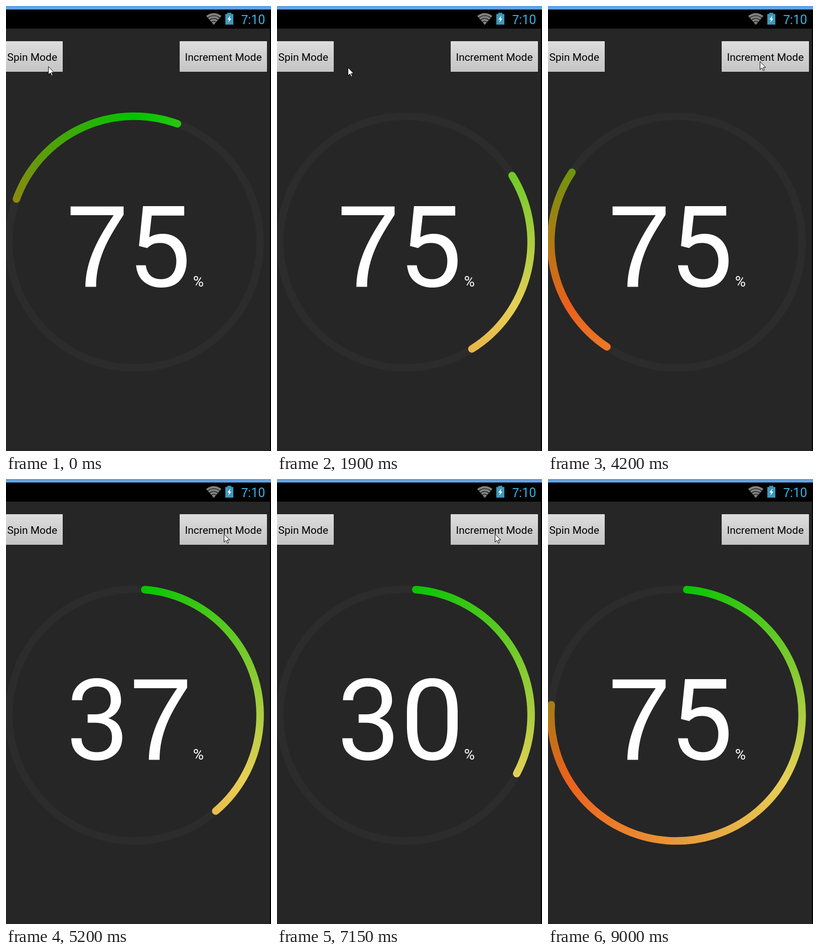
Recreate the animation shown at these times as an HTML page with a canvas. Size 528 by 885 pixels, loop 9300 ms.

```html
<!DOCTYPE html>
<html lang="en">
<head>
<meta charset="utf-8">
<title>Progress wheel</title>
<style>
  html, body { margin: 0; width: 528px; height: 885px; overflow: hidden; background: #262626; }
  canvas, svg { position: absolute; left: 0; top: 0; display: block; }
  text { font-family: Roboto, "Open Sans", sans-serif; font-kerning: none; white-space: pre; }
  .label { font-size: 21px; text-anchor: middle; fill: #000; }
  .count { font-size: 225px; fill: #fff; }
  .unit { font-size: 29px; fill: #fff; }
  .clock { font-size: 25px; fill: #33b5e5; }
  /* a seven with a curved stem */
  .seven { font-family: "Liberation Sans", Arial, sans-serif; font-size: 1.033em; letter-spacing: -.017em; }
</style>
</head>
<body>
<canvas id="wheel" width="528" height="885"></canvas>
<svg width="528" height="885" viewBox="0 0 528 885">
  <defs>
    <linearGradient id="grey" x2="0" y2="1">
      <stop offset="0" stop-color="#dedede"/>
      <stop offset=".5" stop-color="#d0d0d0"/>
      <stop offset="1" stop-color="#c5c5c5"/>
    </linearGradient>
    <linearGradient id="orange" x2="0" y2="1">
      <stop offset="0" stop-color="#ffa000"/>
      <stop offset="1" stop-color="#ffa724"/>
    </linearGradient>
  </defs>

  <rect width="528" height="7" fill="#62a2e4"/>
  <rect y="7" width="528" height="38"/>
  <rect x="526" y="45" width="2" height="840"/>

  <g id="wifi" fill="none" stroke="#808080" stroke-width="4.5"></g>
  <path d="M441 13.5h8v2.5h4v21h-16v-21h4z" fill="#3b99bf"/>
  <path d="M447 19l-6 8h3.5l-1.5 6 6-8h-3.5z" fill="#fff"/>
  <text class="clock" x="468.5" y="35.5" id="clock"></text>

  <g>
    <rect x="-10" y="70" width="123" height="62" rx="2" fill="#161616"/>
    <rect x="-10" y="70" width="123" height="61" rx="1" fill="url(#grey)"/>
    <path d="M-10 130.5h122" stroke="#adadad"/>
    <text class="label" x="52.3" y="109">Spin Mode</text>
  </g>
  <g>
    <rect x="345.5" y="70" width="175" height="62" rx="2" fill="#161616"/>
    <rect id="button" x="346" y="70" width="174" height="61" rx="1" fill="url(#grey)"/>
    <path id="edge" d="M347 130.5h172" stroke="#adadad"/>
    <text class="label" x="433" y="109">Increment Mode</text>
  </g>

  <text class="count" id="count" y="558"></text>
  <text class="unit" id="unit" y="558">%</text>

  <path id="cursor" d="M.5 .5v16l3.8-3.5 2.6 5.7 2.4-1.1-2.6-5.4h5z" fill="#fff" stroke="#000"/>
</svg>
<script>
const LOOP = 9300;
const CX = 256, CY = 469.5, RADIUS = 250.3;
const START = 4.7, GOAL = 270;
const DIGIT = 126.4, UNIT = 20.5;

// each motion advances by `gain` degrees every `step` ms
const SPIN = { start: 0, step: 135.4, gain: 9.15 };
const RUNS = [
  { start: 4500, step: 139.5, gain: 27 },
  { start: 6620, step: 132, gain: 28.25 }
];

const $ = id => document.getElementById(id);
const ctx = $('wheel').getContext('2d');
const rad = deg => (deg - 90) * Math.PI / 180;
const steps = (motion, t) => Math.floor((t - motion.start) / motion.step);
const part = (t, start, length) => Math.min(1, Math.max(0, (t - start) / length));
const digits = s => String(s).replace(/7/g, '<tspan class="seven" dx="-.013em">7</tspan>');

const sweep = ctx.createConicGradient(rad(0), CX, CY);
['rgb(0,196,0)', 'rgb(230,208,86)', 'rgb(236,96,28)', 'rgb(0,196,0)']
  .forEach((color, i) => sweep.addColorStop(i / 3, color));

function arc(from, to, color) {
  ctx.beginPath();
  ctx.arc(CX, CY, RADIUS, rad(from), rad(to));
  ctx.strokeStyle = color;
  ctx.stroke();
}

function drawWifi() {
  const x = 414, y = 37.5, s = Math.sin(0.71), c = Math.cos(0.71);
  const fan = r => `M${x - r * s} ${y - r * c}A${r} ${r} 0 0 1 ${x + r * s} ${y - r * c}`;
  $('wifi').innerHTML = [21, 15.5, 10].map(r => `<path d="${fan(r)}"/>`).join('') +
    `<path d="${fan(6.7)}L${x} ${y}z" fill="#808080" stroke="none"/>`;
}

function drawCount(n) {
  const width = DIGIT * String(n).length;
  const left = 256.5 - (width + UNIT) / 2;
  $('count').innerHTML = digits(n);
  $('count').setAttribute('x', left);
  $('unit').setAttribute('x', left + width);
}

function drawCursor(t) {
  const across = 1 - (1 - part(t, 1560, 2940)) ** 1.48;
  const away = part(t, 8325, 600);
  const x = 84 + 350 * across + 94 * away;
  const y = 120 - 11 * across + 28 * across * (1 - across) + 776 * away ** 1.6;
  $('cursor').setAttribute('transform', `translate(${Math.round(x)} ${Math.round(y)})`);
}

function draw(t) {
  // a run shows nothing new until its first step is over
  const run = RUNS.filter(r => steps(r, t) > 0).pop();

  ctx.clearRect(0, 0, 528, 885);
  ctx.lineWidth = 15;
  ctx.lineCap = 'round';
  arc(0, 360, '#2c2c2c');

  let span = GOAL;
  if (run) {
    span = Math.min(GOAL, steps(run, t) * run.gain);
    arc(START, START + span, sweep);
  } else {
    const head = 20 + steps(SPIN, t) * SPIN.gain;
    arc(head - 90, head, sweep);
  }
  // the number trails the arc slightly
  drawCount(span < GOAL ? Math.floor(span / 3.6 - 0.45) : 75);

  const pressed = steps(RUNS[1], t) === 0;
  $('button').setAttribute('fill', pressed ? 'url(#orange)' : 'url(#grey)');
  $('edge').style.display = pressed ? 'none' : '';

  drawCursor(steps(SPIN, t) * SPIN.step);
}

function tick() {
  draw(performance.now() % LOOP);
  requestAnimationFrame(tick);
}

$('clock').innerHTML = digits('7:10');
drawWifi();
tick();
</script>
</body>
</html>
```
